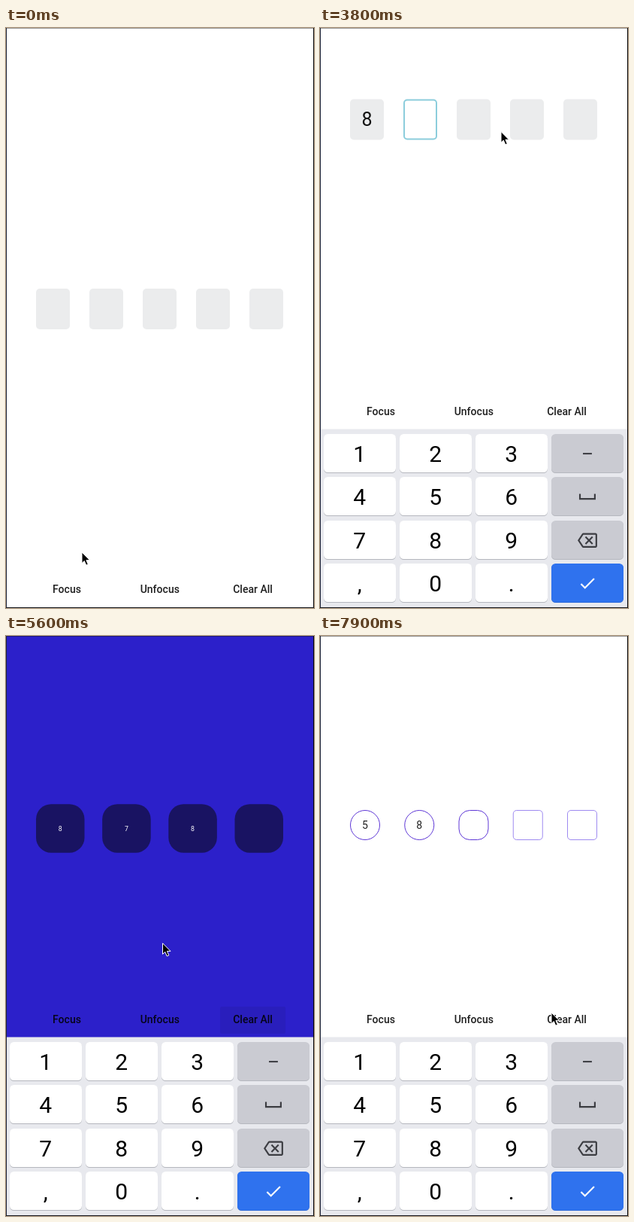
An HTML page that plays this animation: 410 by 770 pixels, repeating every 8 s.

```html
<!DOCTYPE html>
<html lang="en">
<head>
<meta charset="utf-8">
<title>PIN fields</title>
<style>
html, body { margin: 0; width: 100%; height: 100%; overflow: hidden; background: #fff; }
svg { display: block; width: 410px; height: 770px; font-family: Roboto, sans-serif; }
text { text-anchor: middle; }
</style>
</head>
<body>
<svg id="stage" viewBox="0 0 410 770"></svg>
<script>
const LOOP = 8000, FADE = 180, LAG = 60, PAGE = 533;
const stage = document.getElementById('stage');

function set(el, attrs) {
  for (const k in attrs) el.setAttribute(k, attrs[k]);
}
function add(parent, tag, attrs, text) {
  const el = document.createElementNS('http://www.w3.org/2000/svg', tag);
  set(el, attrs);
  if (text) el.textContent = text;
  parent.appendChild(el);
  return el;
}
const ramp = (t, a, b) => Math.max(0, Math.min(1, (t - a) / (b - a)));
const lerp = (a, b, p) => a + (b - a) * p;
const mix = (a, b, p) => a.map((v, i) => lerp(v, b[i], p));
const rgb = c => `rgb(${c.map(Math.round)})`;
const smooth = p => p * p * (3 - 2 * p);

// Each field is idle (0), active (1) or filled (2)
const GREY = [235, 236, 237], WHITE = [255, 255, 255], NAVY = [25, 19, 98];
const BLUE = [44, 32, 202], SKY = [140, 205, 220];
const VIOLET = [94, 55, 214], LILAC = [158, 138, 240];
const pages = [
  { n: 5, w: 45, h: 54, dy: 0, size: 25, ink: '#111', alpha: 1,
    fill: k => k === 1 ? WHITE : GREY, line: () => SKY, width: k => k === 1 ? 2 : 0, radius: () => 5 },
  { n: 4, w: 64.5, h: 64.5, dy: 0.4, size: 20, ink: '#fff', alpha: 1,
    fill: () => NAVY, line: () => NAVY, width: () => 0, radius: () => 20 },
  { n: 5, w: 40, h: 40, dy: -4, size: 14, ink: '#222', alpha: 0,
    fill: () => WHITE, line: k => k ? VIOLET : LILAC, width: () => 1, radius: k => k ? 10 + 5 * k : 5 }
];

const back = add(stage, 'rect', { width: 410, height: 770 });
for (const pg of pages) {
  pg.g = add(stage, 'g', {});
  pg.boxes = Array.from({ length: pg.n }, (_, i) => ({
    x: 40 + i * (329 - pg.w) / (pg.n - 1),
    rect: add(pg.g, 'rect', { 'fill-opacity': pg.alpha }),
    text: add(pg.g, 'text', { 'font-size': pg.size, fill: pg.ink, y: pg.size * 0.355 })
  }));
}

// Where the pointer lands for each button and key
const spots = {};

const bar = add(stage, 'g', {});
const glows = {};
['Focus', 'Unfocus', 'Clear All'].forEach((label, i) => {
  const x = 81 + 123.8 * i;
  glows[label] = add(bar, 'rect', { x: x - 43.5, y: -17, width: 87, height: 36, rx: 2 });
  add(bar, 'text', { x, y: 5, 'font-size': 14, 'font-weight': 500, 'fill-opacity': 0.88 }, label);
  spots[label] = [x - 8, i ? 511 : 742];
});

const keys = add(stage, 'g', {});
add(keys, 'rect', { y: 532.5, width: 410, height: 240, fill: '#e8e9ee' });
const icons = {
  '-': 'M6.5 10.9h11v1.9h-11z',
  '_': 'M20.2 8.5v5.2H3.8V8.5H1.8v7.2h20.4V8.5z',
  '<': 'M22 3H7c-.7 0-1.2.4-1.6.9L0 12l5.4 8.1c.4.5.9.9 1.6.9h15c1.1 0 2-.9 2-2V5c0-1.1-.9-2-2-2zm0 16H7L2.4 12 7 5h15zm-11.6-2L14 13.4l3.6 3.6 1.4-1.4-3.6-3.6L19 8.4 17.6 7 14 10.6 10.4 7 9 8.4l3.6 3.6L9 15.6z',
  '+': 'M9 16.2L4.8 12l-1.4 1.4L9 19 21 7l-1.4-1.4z'
};
['123-', '456_', '789<', ',0.+'].forEach((row, r) => [...row].forEach((ch, c) => {
  const x = 5 + 101 * c, y = Math.floor(539 + 57.5 * r), enter = ch === '+';
  const fill = enter ? '#2f72ee' : c < 3 ? '#fff' : '#cacbd2';
  add(keys, 'rect', { x, y: y + 1, width: 96, height: 51, rx: 5.5, fill: enter ? '#2c69d9' : '#b5b7be' });
  add(keys, 'rect', { x, y, width: 96, height: 51, rx: 5.5, fill });
  if (icons[ch]) {
    add(keys, 'path', { d: icons[ch], transform: `translate(${x + 35} ${y + 13.3}) scale(1.08)`,
      fill: enter ? '#fff' : '#3c3d42' });
  } else {
    add(keys, 'text', { x: x + 47.8, y: y + 37, 'font-size': 30 }, ch);
  }
  spots[ch] = [x + 51, y + 31];
}));

// Window edges
const edge = (x, y, width, height, fill) => add(stage, 'rect', { x, y, width, height, fill });
edge(0, 0, 410, 1, 'rgba(0,0,0,.38)');
edge(0, 0, 1, 770, '#1b2238');
edge(409, 0, 1, 770, '#050508');
edge(0, 769, 410, 1, '#15171d');

const pointer = add(stage, 'path', {
  d: 'M0 0V14.6L3.3 11.5L5.7 17.2L8.3 16.1L5.9 10.6H10.5Z',
  stroke: '#fff', 'stroke-linejoin': 'round'
});

// The session: everything on screen follows from these steps
const stops = [], presses = [], swipes = [];
const entries = [{ t: -FADE, text: '', focus: false }];

function hover(t, x, y, drag) {
  stops.push({ t, x, y, drag });
}
function tap(t, name) {
  hover(t, ...spots[name]);
  const old = entries[entries.length - 1].text;
  const text = glows[name] ? '' : name === '<' ? old.slice(0, -1) : old + name;
  entries.push({ t: t + LAG, text, focus: true });
  if (glows[name]) presses.push({ t, glow: glows[name] });
}
function swipe(start, end, x, y, pull) {
  hover(start, x, y);
  hover(end, x, y - pull, true);
  swipes.push({ start, end, pull });
}

hover(0, 101, 696);
tap(500, 'Focus');
tap(1160, '8');
tap(1490, '5');
tap(1950, '4');
tap(2600, '<');
tap(2850, '<');
swipe(3500, 3810, 241, 271, 137.4);
hover(4400, 94, 663);
tap(4620, '7');
tap(5020, '8');
tap(5440, 'Clear All');
swipe(5900, 6070, 200, 400, 178);
hover(6300, 133, 596);
tap(6660, '5');
tap(7160, '8');
hover(7900, 308, 500);

// A finger drag, then a critically damped spring to the next page
function scrolled(t, { start, end, pull }) {
  if (t < end) return pull * ramp(t, start, end);
  const k = (t - end) * 0.014;
  return PAGE - (PAGE - pull) * (1 + k) * Math.exp(-k);
}

// Move on soon after each stop, taking longer over longer ways
function pointerAt(t) {
  const i = stops.findIndex(s => s.t > t);
  if (i < 0) return stops[stops.length - 1];
  const a = stops[i - 1], b = stops[i], gap = b.t - a.t;
  const time = Math.min(gap - 20, 70 + 0.6 * Math.hypot(b.x - a.x, b.y - a.y));
  const p = b.drag ? (t - a.t) / gap : smooth(ramp(t, a.t + 20, a.t + 20 + time));
  return { x: lerp(a.x, b.x, p), y: lerp(a.y, b.y, p) };
}

function kind(i, { text, focus }) {
  return i < text.length ? 2 : focus && i === text.length ? 1 : 0;
}

function drawPage(pg, y, was, now, p) {
  pg.boxes.forEach((b, i) => {
    const from = kind(i, was), to = kind(i, now);
    const w = lerp(pg.width(from), pg.width(to), p);
    set(b.rect, {
      x: b.x + w / 2, y: y - pg.h / 2 + w / 2, width: pg.w - w, height: pg.h - w,
      rx: lerp(pg.radius(from), pg.radius(to), p) - w / 2,
      fill: rgb(mix(pg.fill(from), pg.fill(to), p)),
      stroke: rgb(mix(pg.line(from), pg.line(to), p)),
      'stroke-width': w
    });
    const scale = lerp(from === 2, to === 2, p);
    b.text.textContent = scale > 0.02 ? now.text[i] || was.text[i] : '';
    set(b.text, { transform: `translate(${b.x + pg.w / 2} ${y}) scale(${scale})` });
  });
}

function draw(t) {
  const open = 1 - Math.pow(1 - ramp(t, 600, 850), 3);
  const mid = lerp(373, 255, open);
  const scroll = swipes.reduce((sum, s) => sum + scrolled(t, s), 0);

  const n = entries.filter(e => e.t <= t).length - 1;
  const now = entries[n], was = entries[Math.max(0, n - 1)];
  const p = ramp(t, now.t, now.t + FADE);
  pages.forEach((pg, i) => drawPage(pg, mid + pg.dy + i * PAGE - scroll, was, now, p));

  const [toBlue, toWhite] = swipes.map(s => ramp(t, s.end + 60, s.end + 286));
  set(back, { fill: rgb(mix(WHITE, BLUE, toBlue - toWhite)) });

  for (const name in glows) set(glows[name], { 'fill-opacity': 0 });
  for (const { t: at, glow } of presses) {
    set(glow, { 'fill-opacity': 0.07 * (ramp(t, at, at + 60) - ramp(t, at + 180, at + 340)) });
  }
  set(bar, { transform: `translate(0 ${lerp(745, 509, open)})` });
  set(keys, { transform: `translate(0 ${lerp(240, 0, open)})` });

  const tip = pointerAt(t);
  set(pointer, { transform: `translate(${tip.x} ${tip.y})` });
}

const begin = performance.now();
function tick() {
  draw((performance.now() - begin) % LOOP);
  requestAnimationFrame(tick);
}
tick();
</script>
</body>
</html>
```
